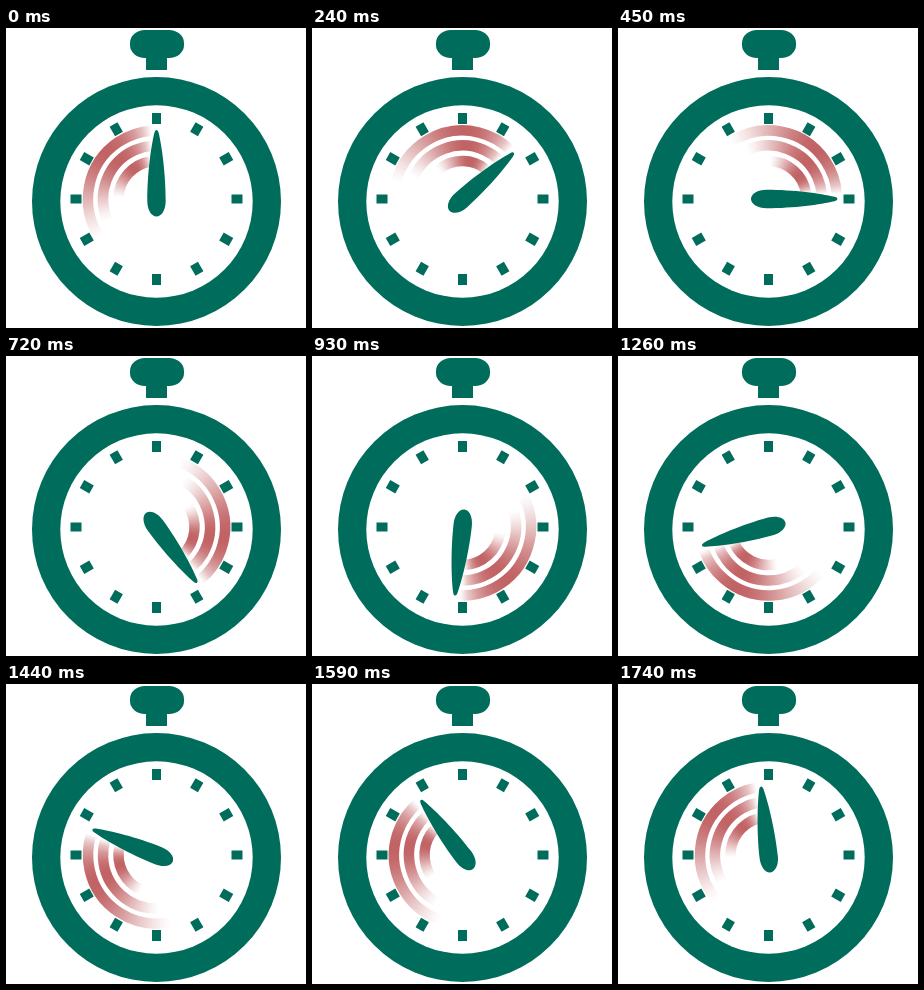
An HTML page with a canvas that plays this animation: 300x300 px, repeating every 1770 ms.

```html
<!DOCTYPE html>
<html lang="en">
<head>
<meta charset="utf-8">
<title>Stopwatch</title>
<style>
  html, body { margin: 0; width: 100%; height: 100%; overflow: hidden; background: #fff; }
  canvas { display: block; width: 300px; height: 300px; }
</style>
</head>
<body>
<canvas id="stage" width="300" height="300"></canvas>
<script>
const ctx = document.getElementById('stage').getContext('2d');
const GREEN = '#006c5b';
const STEP = 30, STEPS = 59, HALF = 30;
const CX = 150.5, CY = 171;
const rad = deg => deg * Math.PI / 180;

// Trail bands: radius, and both ends in degrees behind the hand
const bands = [
  { r: 68.5, tail: 124, head: 4 },
  { r: 53.5, tail: 114, head: 5 },
  { r: 38, tail: 88, head: 9 }
];

// Opacity along a band, u = 0 at the tail and 1 at the head
const fade = u => Math.max(0, Math.sin(Math.PI * u ** 1.6)) ** 0.8;

function disc(x, y, r, fill) {
  ctx.fillStyle = fill;
  ctx.beginPath();
  ctx.arc(x, y, r, 0, 2 * Math.PI);
  ctx.fill();
}

function spin(deg, draw) {
  ctx.save();
  ctx.translate(CX, CY);
  ctx.rotate(rad(deg));
  draw();
  ctx.restore();
}

function drawCase() {
  ctx.fillStyle = '#fff';
  ctx.fillRect(0, 0, 300, 300);
  ctx.fillStyle = GREEN;
  ctx.beginPath();
  ctx.roundRect(124, 2, 54, 28, [{ x: 15, y: 13 }]);
  ctx.fill();
  ctx.fillRect(140, 28, 21, 14);
  disc(150.5, 173.5, 124.5, GREEN);
  disc(150.5, 173.5, 96.2, '#fff');
  ctx.fillStyle = GREEN;
  for (let i = 0; i < 12; i++) spin(i * 30, () => ctx.fillRect(-4.5, -86, 9, 11));
}

function drawTrail() {
  const stops = 16;
  ctx.lineWidth = 10.5;
  for (const { r, tail, head } of bands) {
    const from = rad(-90 - tail), to = rad(-90 - head);
    const paint = ctx.createConicGradient(from, 0, 0);
    for (let i = 0; i <= stops; i++) {
      const u = i / stops;
      paint.addColorStop(u * (tail - head) / 360, `rgba(193, 98, 100, ${fade(u).toFixed(3)})`);
    }
    ctx.strokeStyle = paint;
    ctx.beginPath();
    ctx.arc(0, 0, r, from, to);
    ctx.stroke();
  }
}

function drawHand() {
  ctx.fillStyle = GREEN;
  ctx.beginPath();
  for (const side of [-1, 1]) {
    ctx.moveTo(0, -69);
    ctx.quadraticCurveTo(side * 1.6, -69, side * 2.2, -66);
    ctx.bezierCurveTo(side * 5.5, -52, side * 9.2, -25, side * 9.2, 2);
    ctx.bezierCurveTo(side * 9.2, 11, side * 5, 17.5, 0, 17.5);
  }
  ctx.fill('evenodd');
  ctx.fillRect(-0.5, -68.5, 1, 85.5);
}

// The second half turn takes one step less than the first
function angleAt(step) {
  return step <= HALF ? step * 180 / HALF : 180 + (step - HALF) * 180 / (STEPS - HALF);
}

const start = performance.now();
function render() {
  const time = Math.max(0, performance.now() - start);
  const step = Math.floor(time / STEP) % STEPS;
  drawCase();
  spin(angleAt(step), () => {
    drawTrail();
    drawHand();
  });
  requestAnimationFrame(render);
}
render();
</script>
</body>
</html>
```
